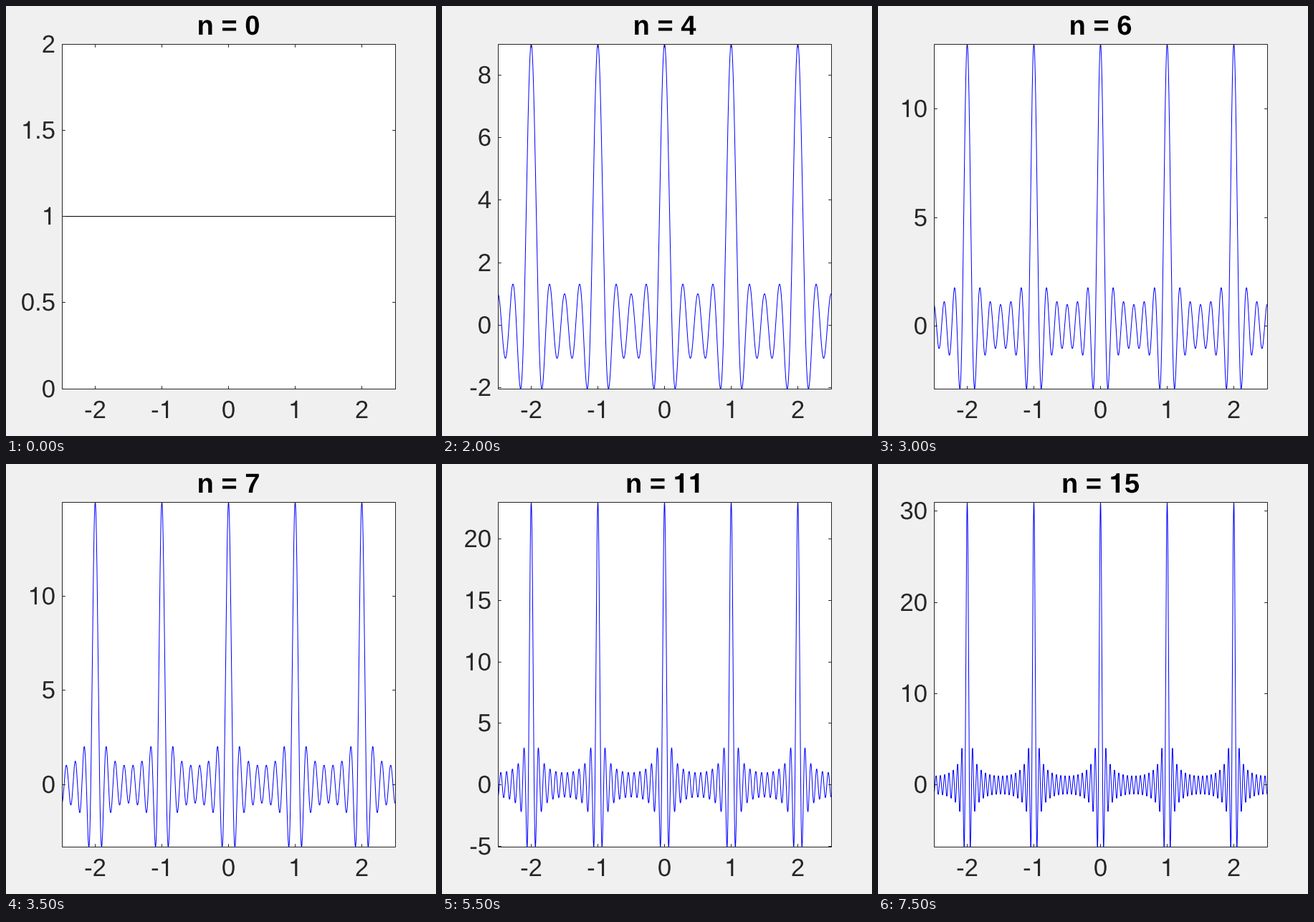
A matplotlib script that plays this animation: 600x600 px, repeating every 8 s.

```python
from functools import lru_cache
from math import ceil, floor

import numpy as np
import matplotlib.pyplot as plt
from matplotlib.animation import FuncAnimation
from matplotlib.patches import PathPatch, Rectangle
from matplotlib.path import Path
from matplotlib.textpath import TextPath

plt.rcParams["text.kerning_factor"] = 6

SIZE, DPI = 600, 100
PX = 72 / DPI                      # one pixel in points
LEFT, RIGHT, TOP, BOTTOM = 78, 543, 53, 534
INK = "#262626"
TICK = 4.8
LABEL, TITLE = 34.67, 38.13        # font sizes in pixels
MIN_GAP = 66                       # least distance between y ticks

X = np.linspace(-2.5, 2.5, 4000)   # skips the integers, where sin(pi x) = 0

fig = plt.figure(figsize=(SIZE / DPI, SIZE / DPI), dpi=DPI, facecolor="#f0f0f0")
ax = fig.add_axes([0, 0, 1, 1])


def to_px(x):
    return (LEFT + RIGHT) / 2 + (RIGHT - LEFT) / 5 * x


def plain_one(size, weight):
    """A numeral one without a foot."""
    if weight == "bold":
        pts = [(378, 0), (378, 710), (267, 710), (253, 593), (69, 584),
               (69, 486), (236, 486), (236, 0), (378, 0)]
    else:
        pts = [(359, 0), (359, 703), (293, 703), (274, 579), (101, 568),
               (101, 505), (271, 505), (271, 0), (359, 0)]
    codes = [Path.MOVETO, Path.LINETO, Path.LINETO, Path.CURVE3, Path.CURVE3,
             Path.LINETO, Path.LINETO, Path.LINETO, Path.CLOSEPOLY]
    return Path(np.array(pts) * size / 1000, codes)


@lru_cache(None)
def glyph(char, size, weight):
    """Outline and advance width of one character."""
    def outline(s):
        font = {"family": "Liberation Sans", "weight": weight}
        return TextPath((0, 0), s, size=size, prop=font)

    advance = outline(char + "|").get_extents().x1 - outline("|").get_extents().x1
    if char == " ":
        return None, advance
    return (plain_one(size, weight) if char == "1" else outline(char)), advance


def text(x, base, s, size, align, color=INK, weight="normal"):
    glyphs = [glyph(c, size, weight) for c in s]
    pen = x - align * sum(adv for _, adv in glyphs)
    for path, adv in glyphs:
        if path is not None:
            verts = path.vertices * (1, -1) + (pen, base)
            ax.add_patch(PathPatch(Path(verts, path.codes), fc=color, lw=0,
                                   ec="none", snap=False, zorder=4))
        pen += adv


def line(xs, ys, color=INK, **kw):
    return ax.plot(xs, ys, color=color, lw=PX, snap=False,
                   solid_capstyle="butt", **kw)[0]


def y_ticks(lo, hi):
    least = (hi - lo) * MIN_GAP / (BOTTOM - TOP)
    step = next(s for s in (0.2, 0.5, 1, 2, 5, 10) if s >= least)
    first, last = ceil(lo / step - 1e-9), floor(hi / step + 1e-9)
    return [k * step for k in range(first, last + 1)]


def draw(n):
    ax.cla()
    ax.set(xlim=(0, SIZE), ylim=(SIZE, 0))
    ax.axis("off")

    # Dirichlet kernel
    y = np.sin((2 * n + 1) * np.pi * X) / np.sin(np.pi * X)
    lo, hi = (y.min(), y.max()) if n else (0, 2)

    def row(v):
        return BOTTOM - (BOTTOM - TOP) * (v - lo) / (hi - lo)

    box = (LEFT + 0.5, TOP + 0.5), RIGHT - LEFT, BOTTOM - TOP
    ax.add_patch(Rectangle(*box, fc="white", ec="none", zorder=1, snap=False))
    curve = line(to_px(X), row(y), "blue" if n else "black", zorder=2)
    curve.set_clip_path(Rectangle((LEFT, TOP), RIGHT - LEFT + 1,
                                  BOTTOM - TOP + 1, transform=ax.transData))
    ax.add_patch(Rectangle(*box, fc="none", ec=INK, lw=PX, zorder=3, snap=False))

    for v in range(-2, 3):
        x = to_px(v)
        line([x, x], [TOP, TOP + TICK], zorder=3)
        line([x, x], [BOTTOM + 1, BOTTOM + 1 - TICK], zorder=3)
        text(x, 575, str(v), LABEL, 0.5)

    for v in y_ticks(lo, hi):
        r = floor(row(v) + 1e-6)
        line([LEFT, LEFT + TICK], [r + 0.5] * 2, zorder=3)
        line([RIGHT + 1, RIGHT + 1 - TICK], [r + 0.5] * 2, zorder=3)
        text(69, r + 12, f"{v:g}", LABEL, 1)

    text(to_px(0), 40, f"n = {n}", TITLE, 0.5, "black", "bold")
    return []


anim = FuncAnimation(fig, draw, frames=16, interval=500, repeat=True,
                     repeat_delay=0, blit=False)
plt.show()
```
